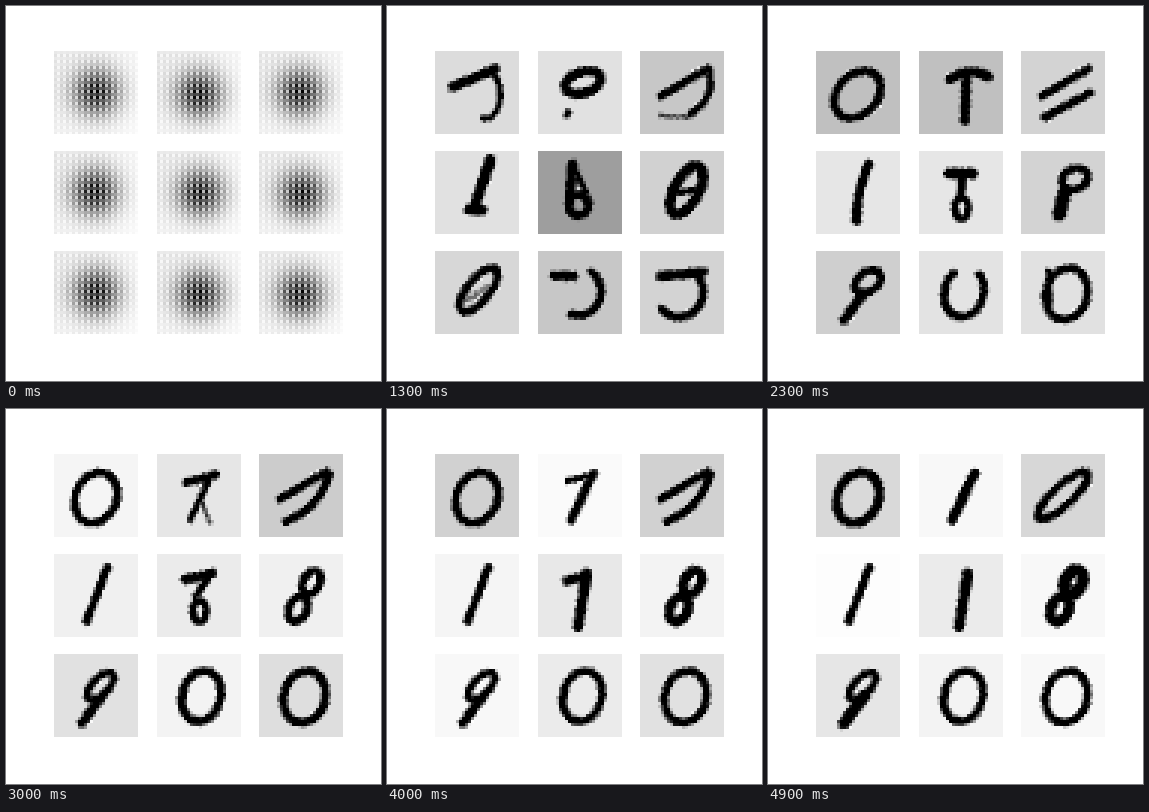
Recreate the animation shown at these times as a matplotlib script. Size 375 px wide and 375 px high, loop 5000 ms.

```python
import numpy as np
import matplotlib.pyplot as plt
from matplotlib.animation import FuncAnimation

STAGE, GRID, FRAMES, INTERVAL = 375, 28, 50, 100
LEFTS, TOPS, CELL_W, CELL_H = (48, 151, 253), (45, 145, 245), 84, 83
FORMED = 7  # frame at which the haze has become strokes

yy, xx = np.mgrid[0:GRID, 0:GRID] + 0.5
t = np.linspace(0, 1, 48)
poses = [[] for _ in range(9)]


def ring(cx, cy, rx, ry, lean=0, width=1.3, start=-.25, sweep=1, level=1):
    """Slanted ellipse or arc; start and sweep are in turns, clockwise from the right."""
    angle = 2 * np.pi * (start + sweep * t)
    dy = ry * np.sin(angle)
    return np.c_[cx + rx * np.cos(angle) - lean * dy, cy + dy], width, level


def line(x0, y0, x1, y1, width=1.3, bow=0, level=1):
    """Straight or bowed stroke."""
    dx, dy = x1 - x0, y1 - y0
    push = bow * np.sin(np.pi * t) / np.hypot(dx, dy)
    return np.c_[x0 + dx * t - dy * push, y0 + dy * t + dx * push], width, level


def thick(shape, extra):
    curve, width, level = shape
    return curve, width + extra, level


def pose(cell, frame, paper, *strokes):
    poses[cell].append((frame, paper, strokes))


tail = line(20.8, 2.5, 18, 8, .8)
core = line(13, 11, 14, 16, 2, level=.55)
drip = line(11, 18, 9.3, 22, .7, level=.5)

# top row
oval = ring(14, 14.6, 7, 8.4, .15)
pose(0, 7, .65, ring(13, 14, 6.3, 6.2, .35, 1.9), core, tail)
pose(0, 13, .86, line(6, 12, 20, 6, 1.6), ring(17, 14.5, 4.8, 8, 0, .9, -.2, .48))
pose(0, 23, .75, ring(13.8, 14.5, 7.4, 7.8, .3))
pose(0, 30, .96, oval)
pose(0, 40, .82, oval)
pose(0, 49, .85, thick(oval, .2))

stem = line(18.5, 6.5, 11, 22, 1.4)
pose(1, 7, .63, ring(15.3, 11.5, 4.6, 4.3, .2, 1.6), drip, tail)
pose(1, 13, .88, ring(15, 10.5, 5.5, 3.8, .5, 1.6), line(10, 20.5, 9.7, 21.5, 1))
pose(1, 23, .75, line(15.8, 9, 15.3, 23, 1.5), line(10.5, 9.5, 23, 8.5, 1.6, -2))
pose(1, 30, .90, thick(stem, -.4), line(10, 9.5, 19.5, 7, 1.4), line(14.5, 15, 17.5, 22.5, .7, level=.7))
pose(1, 40, .98, stem, line(10, 9, 18, 7, 1))
pose(1, 49, .97, thick(stem, .2))

upper, lower = line(7, 15, 22.5, 6, 1.3), line(23.5, 7, 9, 22.5, 1.3, -2.5)
pose(2, 7, .63, ring(14, 14, 6.5, 6, .4, 2), core, tail)
pose(2, 13, .78, upper, line(23, 6, 17, 21, 1.1, -3), line(7, 21.5, 16, 22, .5, level=.7))
pose(2, 23, .83, upper, line(23, 14, 8, 22))
pose(2, 30, .80, upper, lower)
pose(2, 40, .82, upper, lower)
pose(2, 49, .84, ring(14, 13.8, 4.6, 7.8, .9))

# middle row
slash = line(17.8, 4.5, 10.8, 22.5)
pose(3, 7, .88, line(19, 3, 12.5, 12, 1.6), line(12, 13, 13.5, 20, 1.2, level=.6), tail)
pose(3, 13, .88, line(18.5, 3, 13, 19, 1.8), line(11.5, 19.5, 15.5, 19.5, 1.8))
pose(3, 23, .90, line(17.5, 4.5, 13.5, 23, 1.5, 1))
pose(3, 30, .94, slash)
pose(3, 40, .96, slash)
pose(3, 49, .99, slash)

bead = ring(14.2, 19, 2.2, 3.5, 0, 1.2)
post = line(16.2, 6.5, 13.4, 24, 1.7)
pose(4, 7, .70, ring(12.8, 17.8, 5, 3.9, 0, 1.6), ring(15, 9, 3.6, 3.2, .2, 1.2), tail)
pose(4, 13, .62, ring(13.5, 18, 3.2, 3.5, 0, 1.4), line(11.5, 4.5, 10.5, 17, 1.6), line(12, 5, 16, 14, .9))
pose(4, 23, .90, bead, line(10, 7.5, 18, 7.5, 1.7), line(14.5, 9, 14, 14, 1.4))
pose(4, 30, .92, bead, line(9.5, 8.5, 18.5, 6.5, 1.5), line(17, 8, 13, 14, 1.1))
pose(4, 40, .91, post, line(9.5, 9, 16.5, 7, 1.4))
pose(4, 49, .92, post)

head, body = ring(17.5, 9.5, 2.9, 4, .25), ring(13, 18.3, 3.1, 4.2, .25)
pose(5, 7, .70, ring(16, 11.5, 4.5, 4.5, .2, 1.6), ring(12.5, 18, 3.4, 3.2, .2, .9, level=.7), tail)
pose(5, 13, .82, ring(15.5, 13, 4.5, 8, .4, 1.7), line(12, 14, 18, 13, 1))
pose(5, 23, .83, ring(18, 9.3, 4.2, 3.6, .2), line(14.5, 14, 12.8, 21, 2.2))
pose(5, 30, .94, head, body)
pose(5, 40, .95, thick(head, .3), thick(body, .3))
pose(5, 49, .97, thick(head, .8), thick(body, .4))

# bottom row
loop, leg = ring(15.5, 10.7, 3.5, 4.5, .6, 1.2), line(16, 14, 9.3, 23, 1.5)
pose(6, 7, .70, ring(15, 12.5, 4.8, 5.3, .25, 1.6), drip, tail)
pose(6, 13, .84, ring(14.5, 13, 4.5, 7.3, .6), line(11, 16, 18, 12, .8, level=.4))
pose(6, 23, .81, ring(17.3, 10.2, 4, 3.8, .4), leg)
pose(6, 30, .88, loop, leg)
pose(6, 40, .97, loop, leg)
pose(6, 49, .90, loop, thick(leg, .4))

oval = ring(14.8, 14.1, 6.5, 8.4, .12)
pose(7, 7, .70, ring(13.5, 12.5, 6.6, 5.8, .2, 2.3), core, tail)
pose(7, 13, .78, ring(13.5, 13.5, 7.5, 8, 0, 1.3, -.15, .45), line(5.5, 8.2, 12, 8.5, 1.5))
pose(7, 23, .89, ring(15, 13.8, 6.6, 8.2, .1, 1.3, -.13, .77))
pose(7, 30, .95, thick(oval, .1))
pose(7, 40, .92, oval)
pose(7, 49, .95, oval)

oval = ring(15.2, 14.3, 7, 8.6, .1)
pose(8, 7, .74, ring(13.5, 9.5, 6, 3.5, .1, 1.7), ring(14, 17.5, 5.8, 4.3, 0, 1.7), tail)
pose(8, 13, .83, ring(13, 13.5, 8, 8.5, 0, 1.3, -.12, .5), line(7, 8.5, 21, 7, 1.6))
pose(8, 23, .88, oval, line(9.3, 7, 9.3, 20, 1.1))
pose(8, 30, .87, thick(oval, .1))
pose(8, 40, .88, oval)
pose(8, 49, .97, oval)


def blend(first, second, u):
    """Morph paired strokes; unpaired ones fade."""
    mixed = []
    for k in range(max(len(first), len(second))):
        if k >= len(second):
            curve, width, level = first[k]
            mixed.append((curve, width, level * (1 - u)))
        elif k >= len(first):
            curve, width, level = second[k]
            mixed.append((curve, width, level * u))
        else:
            mixed.append(tuple(a + (b - a) * u for a, b in zip(first[k], second[k])))
    return mixed


def digit(cell, frame):
    keys = poses[cell]
    i = max(k for k in range(len(keys) - 1) if keys[k][0] <= frame)
    (t0, paper0, strokes0), (t1, paper1, strokes1) = keys[i], keys[i + 1]
    u = (frame - t0) / (t1 - t0)
    rng = np.random.default_rng(100 * cell + frame)
    loose = np.sin(np.pi * u)
    paper = np.clip(paper0 + (paper1 - paper0) * u + loose * rng.uniform(-.05, .05), 0, 1)

    grain = np.random.default_rng(cell).random((GRID, GRID))
    ink = np.zeros((GRID, GRID))
    for curve, width, level in blend(strokes0, strokes1, u):
        curve = curve + loose * rng.uniform(-.3, .3, 2)
        dist = np.hypot(xx[..., None] - curve[:, 0], yy[..., None] - curve[:, 1]).min(-1)
        edge = np.clip(width + .6 - dist + .5 * (grain - .5), 0, 1)
        tone = np.clip(level * (1 + 1.4 * (1 - level) * (grain - .5)), 0, 1)
        ink = np.maximum(ink, edge * tone)

    # pale specks in the nooks of a stroke
    near = np.zeros_like(ink)
    near[1:-1, 1:-1] = ink[:-2, 1:-1] * ink[1:-1, :-2] + ink[2:, 1:-1] * ink[1:-1, 2:]
    specks = (ink < .3) & (near > .3) & (grain > .6)
    return np.where(specks, .2 * paper + .8, paper) * (1 - ink)


def haze(cell):
    """Soft woven spot, fading towards the right and the bottom."""
    cx, cy = 14 + np.random.default_rng(cell).uniform(-.5, .5, 2)
    spot = .95 * np.exp(-((xx - cx) ** 2 + (yy - cy) ** 2) / 60)
    veil = .12 * (1 - .6 * xx / GRID) * (1 - .4 * yy / GRID)
    weave = np.tile([[.75, .68], [1, .28]], (GRID // 2, GRID // 2))
    return 1 - np.clip((spot + veil) * weave, 0, 1)


def tile(cell, frame):
    mix = min(frame / FORMED, 1)
    return (1 - mix) * haze(cell) + mix * digit(cell, max(frame, FORMED))


rows = np.arange(CELL_H) * GRID // CELL_H
cols = np.arange(CELL_W) * GRID // CELL_W


def compose(frame):
    canvas = np.ones((STAGE, STAGE))
    for cell in range(9):
        top, left = TOPS[cell // 3], LEFTS[cell % 3]
        canvas[top:top + CELL_H, left:left + CELL_W] = tile(cell, frame)[np.ix_(rows, cols)]
    return canvas


fig = plt.figure(figsize=(STAGE / 100, STAGE / 100), dpi=100, facecolor="white")
ax = fig.add_axes([0, 0, 1, 1])
ax.axis("off")
picture = ax.imshow(compose(0), cmap="gray", vmin=0, vmax=1, interpolation="nearest", aspect="auto")


def update(frame):
    picture.set_data(compose(frame))
    return [picture]


anim = FuncAnimation(fig, update, frames=FRAMES, interval=INTERVAL, repeat=True, repeat_delay=0)
plt.show()
```
